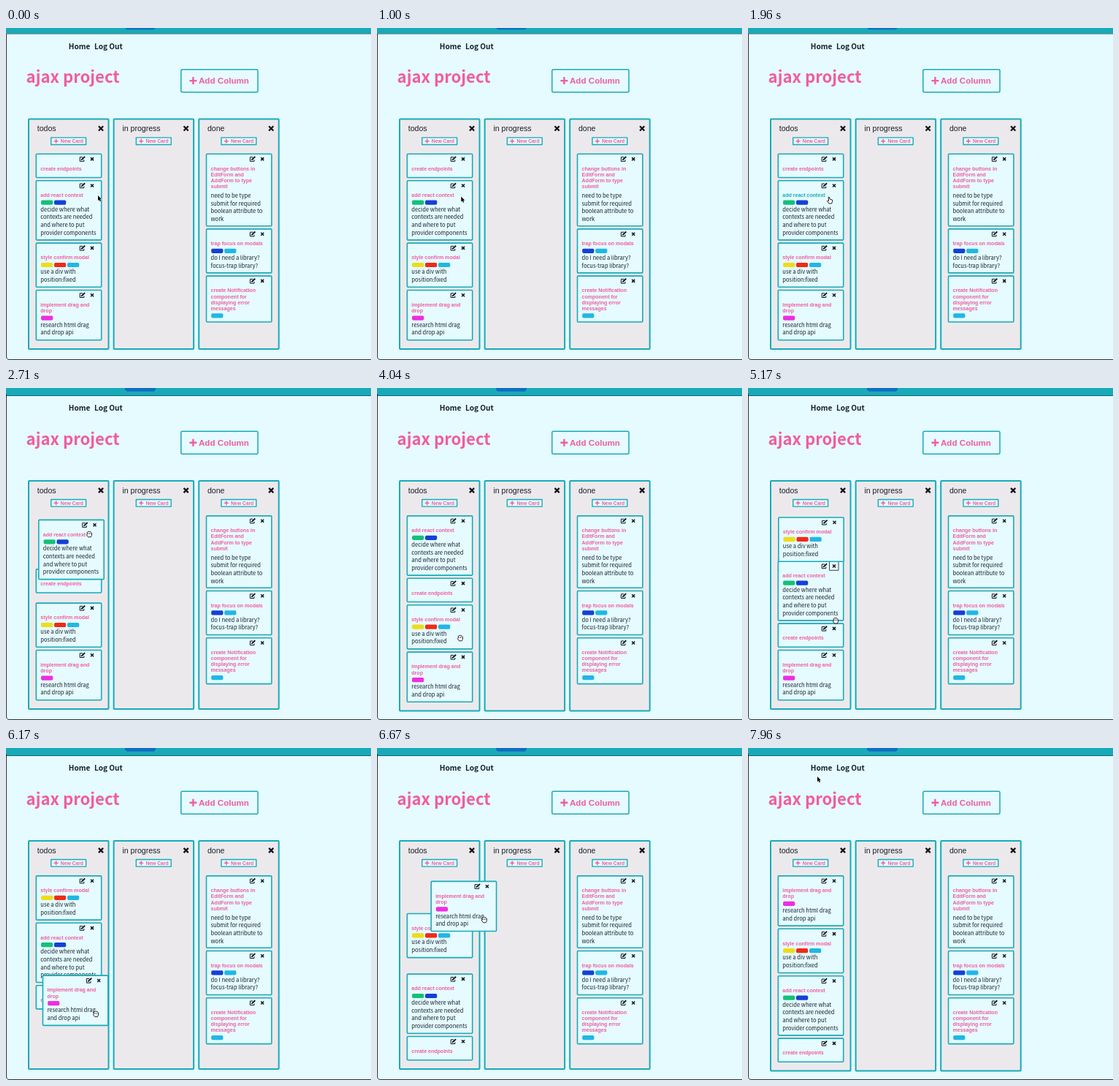
An HTML page with a canvas for the animation above (8000 ms loop, 500 by 454 pixels).

```html
<!DOCTYPE html>
<html lang="en">
<head>
<meta charset="utf-8">
<title>Kanban board</title>
<style>
  html, body { margin: 0; width: 100%; height: 100%; overflow: hidden; background: #e5fbff; }
  canvas { display: block; width: 500px; height: 454px; }
</style>
</head>
<body>
<canvas id="stage"></canvas>
<script>
const LOOP = 8000, GAP = 2.6, LIST_TOP = 174.5, CARD_X = 41, COLUMN_STEP = 116.6;
const PAPER = '#e5fbff', TEAL = '#17abb9', PINK = '#f25c9f', INK = '#17212a', COLUMN = '#ece9ec';
const GREEN = '#14c07a', BLUE = '#1540d6', YELLOW = '#eedc18', RED = '#f02a18', CYAN = '#22b6e4', MAGENTA = '#ee2ee0';
const SANS = '"Noto Sans CJK JP", "Noto Sans CJK SC", "Noto Sans CJK", "Noto Sans", sans-serif';
const ARIAL = '"Liberation Sans", Arial, sans-serif';

const card = (height, title, tags, body) => ({ height, title, tags, body });
const cards = {
  endpoints: card(33.8, ['create endpoints'], [], []),
  context: card(82.8, ['add react context'], [GREEN, BLUE],
    ['decide where what', 'contexts are needed', 'and where to put', 'provider components']),
  modal: card(61.8, ['style confirm modal'], [YELLOW, RED, CYAN], ['use a div with', 'position:fixed']),
  drag: card(69.8, ['implement drag and', 'drop'], [MAGENTA], ['research html drag', 'and drop api'])
};
const done = [
  card(100, ['change buttons in', 'EditForm and', 'AddForm to type', 'submit'], [],
    ['need to be type', 'submit for required', 'boolean attribute to', 'work']),
  card(61.6, ['trap focus on modals'], [BLUE, CYAN], ['do I need a library?', 'focus-trap library?']),
  card(64.5, ['create Notification', 'component for', 'displaying error', 'messages'], [CYAN], [])
];

// Each drag: when it is held and released, and where the card is gripped.
const SETTLE = 300;
const drags = [
  { id: 'context', start: 2250, drop: 2950, grip: [69.5, 20] },
  { id: 'modal', start: 4250, drop: 4920, grip: [73, 45.5] },
  { id: 'drag', start: 5980, drop: 6850, grip: [73, 53] }
];

// List order over time; the held card leaves a slot without a gap.
const states = [
  [0, 'endpoints context modal drag'],
  [2250, 'endpoints context modal drag', 'context'],
  [2554, 'context endpoints modal drag', 'context'],
  [3250, 'context endpoints modal drag'],
  [4250, 'context endpoints modal drag', 'modal'],
  [4420, 'context modal endpoints drag', 'modal'],
  [4630, 'modal context endpoints drag', 'modal'],
  [5220, 'modal context endpoints drag'],
  [5980, 'modal context endpoints drag', 'drag'],
  [6180, 'modal context drag endpoints', 'drag'],
  [6360, 'modal drag context endpoints', 'drag'],
  [6538, 'drag modal context endpoints', 'drag'],
  [7150, 'drag modal context endpoints']
].map(([time, order, held]) => ({ time, tops: listTops(order.split(' '), held) }));

const cursorPath = [
  [0, 126, 229], [500, 126, 229], [1200, 111, 231], [2250, 111, 231], [2710, 114, 200],
  [2950, 113, 194], [3150, 113, 200], [3800, 114, 342], [4250, 114, 342], [4750, 118, 214],
  [4920, 121, 250], [5170, 120, 318], [5650, 114, 413], [5980, 114, 413], [6670, 147, 235],
  [6850, 122, 228], [7100, 120, 220], [7850, 95, 39], [8000, 95, 39]
];

const canvas = document.getElementById('stage');
const ratio = window.devicePixelRatio || 1;
canvas.width = 500 * ratio;
canvas.height = 454 * ratio;
const ctx = canvas.getContext('2d');

const mix = (a, b, k) => a + (b - a) * k;
const ease = k => { k = Math.min(1, Math.max(0, k)); return k * k * (3 - 2 * k); };

function listTops(order, held) {
  const tops = {};
  let y = LIST_TOP;
  for (const id of order) {
    tops[id] = y;
    y += cards[id].height + (id === held ? 0 : GAP);
  }
  return tops;
}

function cursorAt(t) {
  const i = Math.max(1, cursorPath.findIndex(p => p[0] > t));
  const [t0, x0, y0] = cursorPath[i - 1], [t1, x1, y1] = cursorPath[i];
  const k = (t - t0) / (t1 - t0);
  return [mix(x0, x1, k), mix(y0, y1, k)];
}

function slotTop(id, t) {
  return states.reduce((y, s) => t < s.time ? y : mix(y, s.tops[id], ease((t - s.time) / 200)), states[0].tops[id]);
}

function cardPosition(id, t, active) {
  const y = slotTop(id, t);
  if (!active || active.id !== id) return [CARD_X, y];
  const [cx, cy] = cursorAt(Math.min(t, active.drop));
  const k = ease((t - active.drop) / SETTLE);
  return [mix(cx - active.grip[0], CARD_X, k), mix(cy - active.grip[1], y, k)];
}

function text(value, x, y, size, color, family, weight = 400) {
  ctx.font = `${weight} ${size}px ${family}`;
  ctx.fillStyle = color;
  ctx.fillText(value, x, y);
}

function box(x, y, w, h, line, fill, radius = 1) {
  ctx.beginPath();
  ctx.roundRect(x + line / 2, y + line / 2, w - line, h - line, radius);
  ctx.fillStyle = fill;
  ctx.fill();
  ctx.lineWidth = line;
  ctx.strokeStyle = TEAL;
  ctx.stroke();
}

function strokes(width, color, ...lines) {
  ctx.beginPath();
  for (const [x0, y0, x1, y1] of lines) { ctx.moveTo(x0, y0); ctx.lineTo(x1, y1); }
  ctx.lineWidth = width;
  ctx.strokeStyle = color;
  ctx.stroke();
}

const cross = (x, y, r, width) =>
  strokes(width, '#10161c', [x - r, y - r, x + r, y + r], [x + r, y - r, x - r, y + r]);
const plus = (x, y, r, width) => strokes(width, PINK, [x - r, y, x + r, y], [x, y - r, x, y + r]);

function editIcon(x, y) {
  ctx.beginPath();
  ctx.moveTo(x + .6, y - 2.5);
  ctx.lineTo(x - 3.3, y - 2.5);
  ctx.lineTo(x - 3.3, y + 3.2);
  ctx.lineTo(x + 2.3, y + 3.2);
  ctx.lineTo(x + 2.3, y + 1);
  ctx.lineWidth = 1;
  ctx.strokeStyle = '#10161c';
  ctx.stroke();
  strokes(1.9, '#10161c', [x - 1.4, y + 1.4, x + 3.6, y - 3.2]);
}

function drawCard({ height, title, tags, body }, x, y, titleColor = PINK, focused = false) {
  box(x - .5, y - .4, 91, height, 1.6, PAPER);
  editIcon(x + 63.5, y + 7.2);
  cross(x + 77, y + 7.2, 2, 1.5);
  if (focused) {
    ctx.lineWidth = .8;
    ctx.strokeRect(x + 70.5, y + 1, 12.5, 12);
  }
  title.forEach((line, i) => text(line, x + 6.3, y + 22.7 + i * 8.15, 7.05, titleColor, ARIAL, 700));
  const last = y + 22.7 + (title.length - 1) * 8.15;
  tags.forEach((color, i) => {
    ctx.beginPath();
    ctx.roundRect(x + 7 + i * 18, last + 4.5, 16.2, 6.2, 1.8);
    ctx.fillStyle = color;
    ctx.fill();
  });
  const first = last + (tags.length ? 19.7 : 13.2);
  body.forEach((line, i) => text(line, x + 6.3, first + i * 10.6, 7.6, INK, SANS));
}

function drawColumn(name, index, bottom) {
  const x = index * COLUMN_STEP;
  box(x + 30, 126, 111.5, bottom - 126, 2, COLUMN);
  text(name, x + 42.8, 143.8, 10.55, INK, ARIAL);
  cross(x + 130, 140, 3.1, 2.3);
  box(x + 61, 151.8, 49.3, 11, 1.4, PAPER, 0);
  plus(x + 68.6, 157.3, 2.9, 1.5);
  text('New Card', x + 74.8, 159.8, 6.75, PINK, ARIAL, 700);
}

function outline(points, x, y) {
  ctx.beginPath();
  points.forEach(([px, py]) => ctx.lineTo(x + px, y + py));
  ctx.closePath();
}

function drawCursor(kind, x, y) {
  ctx.lineJoin = 'round';
  if (kind === 'arrow') {
    outline([[0, 0], [0, 7.2], [1.6, 5.8], [2.7, 8.3], [4, 7.7], [2.9, 5.3], [5, 5.2]], x, y);
    ctx.lineWidth = 1;
    ctx.strokeStyle = '#fff';
    ctx.stroke();
    ctx.fillStyle = '#000';
    ctx.fill();
    return;
  }
  if (kind === 'pointer') {
    outline([[-.9, .3], [.4, .2], [1, 3], [4.4, 4], [4.6, 6.3], [3.6, 9], [0, 9], [-2.6, 5.6], [-1.6, 5], [-.4, 5.8]], x, y);
  } else {
    outline([[-2.8, -2.6], [-1.2, -3.6], [.6, -3.7], [2.3, -2.9], [3.5, -1.4], [3.4, 1.3], [2.2, 3.8],
      [-1.4, 3.8], [-3.7, .8], [-2.6, .1]], x, y);
  }
  ctx.fillStyle = '#fff';
  ctx.fill();
  ctx.lineWidth = .9;
  ctx.strokeStyle = '#111';
  ctx.stroke();
  if (kind === 'grab') strokes(.6, '#111', [x - 1, y - 1.8, x - 1, y], [x + .6, y - 1.8, x + .6, y], [x + 2, y - 1.5, x + 2, y]);
}

function drawPage(t) {
  const active = drags.find(d => t >= d.start && t < d.drop + SETTLE);
  ctx.fillStyle = TEAL;
  ctx.fillRect(0, -5, 500, 15);
  ctx.fillStyle = '#0f6ec4';
  ctx.beginPath();
  ctx.roundRect(163, -10, 42, 14.8, 4);
  ctx.fill();
  strokes(1, '#1b5f6b', [0, 10.5, 500, 10.5]);

  text('Home', 85.8, 31.3, 10.1, INK, SANS, 700);
  text('Log Out', 121, 31.3, 10.1, INK, SANS, 700);
  text('ajax project', 27.6, 77.6, 22.1, PINK, SANS, 700);
  box(239, 58.5, 106.8, 32.6, 1.5, PAPER, 2);
  plus(256.4, 74.7, 5, 2.4);
  text('Add Column', 264, 79, 11.6, PINK, ARIAL, 700);

  const bottom = active ? 440 : 440 + GAP;
  ['todos', 'in progress', 'done'].forEach((name, i) => drawColumn(name, i, bottom));
  let y = LIST_TOP;
  for (const item of done) {
    drawCard(item, CARD_X + 2 * COLUMN_STEP, y);
    y += item.height + GAP;
  }
  const ids = Object.keys(cards).sort((a, b) => (active?.id === a) - (active?.id === b));
  for (const id of ids) {
    const hovered = id === 'context' && t > 1100 && t < 2250;
    const focused = id === 'context' && t > 5060 && t < 5260;
    drawCard(cards[id], ...cardPosition(id, t, active), hovered ? TEAL : PINK, focused);
  }
}

function drawWindowEdge() {
  ctx.beginPath();
  ctx.moveTo(.5, 8);
  ctx.lineTo(.5, 449);
  ctx.quadraticCurveTo(.5, 453.5, 5, 453.5);
  ctx.lineTo(500, 453.5);
  ctx.lineWidth = 1;
  ctx.strokeStyle = '#2a3336';
  ctx.stroke();
}

function draw(now) {
  const t = now % LOOP;
  ctx.setTransform(ratio, 0, 0, ratio, 0, 0);
  ctx.fillStyle = PAPER;
  ctx.fillRect(0, 0, 500, 454);
  ctx.save();
  // The page is scrolled to its end until the first drag shortens it.
  if (t < drags[0].start) ctx.translate(0, -GAP);
  drawPage(t);
  ctx.restore();
  drawWindowEdge();
  const kind = t < 1100 || t > 7300 ? 'arrow' : t < 2250 ? 'pointer' : 'grab';
  drawCursor(kind, ...cursorAt(t));
  requestAnimationFrame(draw);
}
requestAnimationFrame(draw);
</script>
</body>
</html>
```
